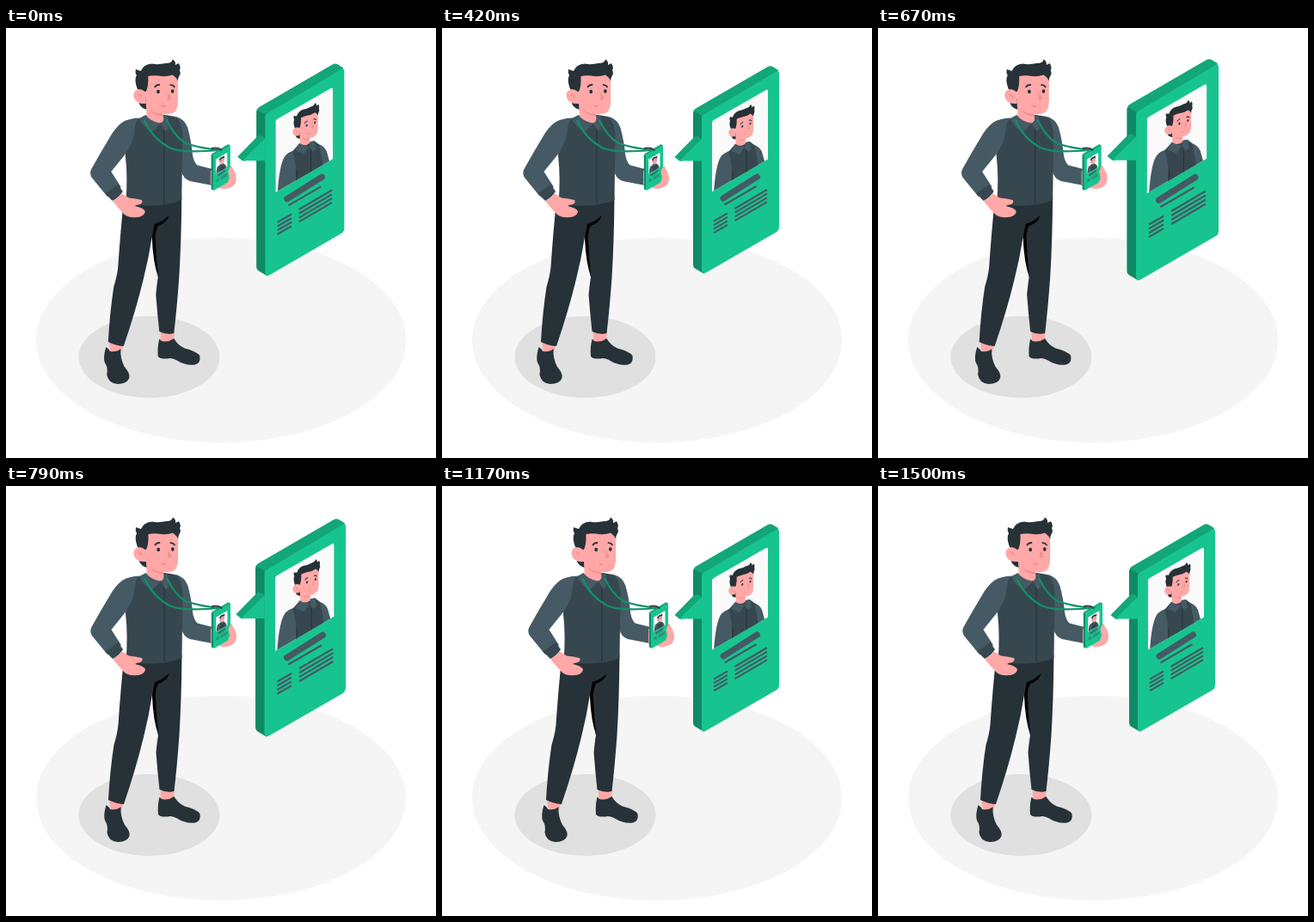
These frames come from a looping animation (500x500 px, 1540 ms). An HTML page:

```html
<!DOCTYPE html>
<html lang="en">
<head>
<meta charset="utf-8">
<title>Badge holder</title>
<style>
  html, body { margin: 0; width: 100%; height: 100%; overflow: hidden; background: #fff; }
  svg { display: block; width: 100%; height: 100%; }
  .green { fill: #17c48f; }
  .top { fill: #13a679; }
  .side { fill: #108a65; }
  .ink { fill: #263238; }
  .vest { fill: #37474f; }
  .sleeve { fill: #455a64; }
  .skin { fill: #ffa8a7; }
  .shade { fill: #f28f8f; }
  .line { fill: none; stroke: #263238; stroke-linecap: round; }
  .bars { fill: none; stroke: #455a64; stroke-width: 2.1; }
  .name { stroke-width: 7; stroke-linecap: round; }
  .strap { fill: none; stroke: #128f68; stroke-width: 2.2; }
</style>
</head>
<body>
<svg viewBox="0 0 500 500">
  <defs>
    <clipPath id="frame"><path d="M314 108 L379 71 V152.500 L314 190.500Z"/></clipPath>

    <g id="head">
      <path class="ink" d="M155 82 L164 82 L165 95 Q158 94 155 88Z"/>
      <path class="skin" d="M163 54 H199 Q201 66 200 77 Q201 92 197 97 Q192 101 183 100 L184 109 Q175 114 164 105 L163 88Z"/>
      <path class="shade" d="M167 94 Q174 100 183 100 L183 102.500 Q172 102 167 94Z"/>
      <path class="ink" d="M153 71 Q149 60 152 55 Q150 52 151 48 L157 50 Q160 42 170 41.500 Q177 43 186 41 Q193 41 194 36.500 Q198 39 197 43 L201 41 Q204 46 202 49 Q204 53 201.500 56 Q200 58 200.500 62 Q198 57 194 54.500 Q186 57.500 177 55.500 Q171 55 165.500 56 Q166 68 163 74 L160 75Z"/>
      <path class="skin" d="M163 75 Q158 70 153 71.500 Q147 74 149 81 Q152 89 163 88Z"/>
      <path class="shade" d="M153 76 Q158 76 159 82 Q155 79 153 76Z"/>
      <ellipse class="ink" cx="177.200" cy="74" rx="1.900" ry="2.200"/>
      <ellipse class="ink" cx="193.800" cy="73.500" rx="1.800" ry="2.200"/>
      <path class="line" stroke-width="1.800" d="M173.500 68.500 Q175 66 178.500 66 M191.500 66.200 Q194.500 66 196 68.500"/>
      <path class="shade" d="M187.500 74 Q192 79 192.500 82 Q190 84.500 187 83 Q190 81.500 187.500 74Z"/>
      <path class="shade" d="M179.500 89 Q183 91 186.500 89.500 Q185 93 182 92.200Z"/>
    </g>

    <g id="body">
      <path class="top" d="M292.500 97 Q293 94.500 296 93 L378 45.500 Q381.500 43.200 384.500 45 L391 49 L389 53 L302 103Z"/>
      <path class="side" d="M292.500 96.500 L303 102 V282 L305 286 L294 279.500 Q292 278 292 275 V99Z"/>
      <path class="green" d="M302 104 Q302 102 304 101 L388 51 Q392 48.500 392 53 V231 Q392 235.500 388.500 237.500 L307 284.500 Q302 287 302 281Z"/>
    </g>

    <g id="data">
      <path fill="#fafafa" d="M314 110 Q314 108 316 107 L376 72.500 Q379 70.500 379 74 V152.500 L314 190.500Z"/>
      <g clip-path="url(#frame)">
        <path class="sleeve" d="M316 192 Q318 160 324 150 Q327 145 336 142.500 L360 135 Q369 137 372 144 L377 162 L340 190Z"/>
        <path class="vest" d="M333 144 L341 135 L358 132 L363 136 Q367 149 369 175 L336 190 Q339 158 333 144Z"/>
        <path class="line" stroke-width=".9" d="M354 143 V175 M336 181 Q339 174 338 165"/>
        <use href="#head" transform="matrix(.56 -.18 0 .6 250 102)"/>
        <path class="sleeve" d="M336.500 143 L341 134.500 Q345 138 352 138.500 L346 147Z M352 138.500 L354 133 L358 132 L360 141 L356 144Z"/>
      </g>
      <path class="bars name" d="M327 198 L366.500 173"/>
      <path class="bars" d="M328.500 205.500 L365.500 184"/>
      <path class="bars" d="M316 224.600 l16 -9.200 m-16 13.700 l16 -9.200 m-16 13.700 l16 -9.200 m-16 13.700 l16 -9.200"/>
      <path class="bars" d="M340.500 210 l37.500 -22 m-37.500 26.700 l37.500 -22 m-37.500 26.700 l37.500 -22 m-37.500 26.700 l37.500 -22"/>
    </g>
  </defs>

  <ellipse cx="250" cy="363" rx="215" ry="119" fill="#f5f5f5"/>
  <ellipse cx="166.500" cy="382.500" rx="82" ry="47.500" fill="#e0e0e0"/>

  <g id="man">
    <path class="skin" d="M120 364 L137 367 L134 377 L122 378Z M180 350 H196 L195 367 L180 366Z"/>
    <path class="ink" d="M116.500 371 Q120 373 121.500 376 Q129 377 133.500 373 Q133 385 138 394 Q145 402 143.500 407 Q141 414 130 414 Q119 413 117.500 403 Q119 394 115.500 390 Q112.500 384 116.500 371Z"/>
    <path class="ink" d="M178.500 361.500 Q181 365 184 364.500 Q190 365 195.500 361 Q200 369 208 372.500 Q222 376 225.500 381 Q227 390 220 391.500 Q209 393 198 386 Q192 383 188 384.500 Q179 385 177 382 Q176 372 178.500 361.500Z"/>
    <path class="ink" d="M137.500 196 H204.500 Q204 250 201.500 290 Q199 325 195.500 355 Q187 357 178.500 353 Q176 330 174.500 310 Q176 295 177 290 L170 243 Q166 268 160 292 Q151 329 137 370 Q128 369.500 119 365 Q121 330 125.500 301 Q129.500 288 130.500 278 Q133 240 137.500 196Z"/>
    <path fill="#000" d="M170 244 L173 228 Q183 225 189.500 218 Q188 226 177 230 Q173 238 174 247 Q175 270 177.300 290 Q171 272 170 244Z"/>

    <path class="sleeve" d="M198 103 Q208 106 211.500 116 Q216 133 217 146 Q218 155 222.500 159.500 L240 164 V183 L214 178 Q206 175 204 166Z"/>
    <path class="vest" d="M153 106 L162 102 L185 101 L197 103 Q204 107 205.500 125 L204.500 200 Q190 206 170 206.500 Q150 207 139.500 203 Q142 175 139 148 Q140 125 153 106Z"/>
    <path class="sleeve" d="M156 104.500 Q142 105 135 110 Q127 116 121 127 Q110 145 99.500 164 Q97 169 100 174 L118 196 L134 185 L122.500 167 L139.500 146 Q150 130 150 116 Q151 108 156 104.500Z"/>
    <path class="vest" d="M115.500 192.500 L130.500 182 L136 190 Q132 197 124 201Z"/>
    <path class="line" stroke-width="1.100" d="M184 118 V204"/>

    <path class="skin" d="M124 201 Q131 198 135 192.500 L143 197.500 Q151 198 158 200 Q160 203 156 205 Q151 206 150 207 Q160 209 162 213 Q162 217 156 219.500 Q145 222 138 217 Q131 210 124 201Z"/>

    <use href="#head"/>
    <path class="sleeve" d="M155 105.500 L162.500 101 Q167 108 180 111 L170 121 Q160 116 155 105.500Z M180 111 Q185 107 184 101 L188.500 103.500 L189 118 L185.500 120Z"/>
    <path class="strap" d="M161 107 Q170 128 190 139 Q205 146 246 142 M187 107 Q196 126 209 134 Q222 139 248 142"/>

    <path class="skin" d="M238 166 Q252 164 260 160 Q264 162 266 167 Q269 175 267 180 Q262 187 252 187 L238 182Z"/>
    <use href="#body" transform="translate(174 125.500) scale(.222)"/>
    <use href="#data" transform="translate(179.800 130.500) scale(.205)"/>
    <path d="M239 140 Q247 138 251.500 142.500" fill="none" stroke="#37474f" stroke-width="2"/>
    <path class="skin" d="M262.500 160 Q259 163 258.500 167 L260 174 L257 182 Q255 185 250 186.500 Q261 188 266 182 Q269 176 267 169 Q266 166 262.500 166 Q264 162 262.500 160Z"/>
  </g>

  <g id="card">
    <use href="#body"/>
    <path class="top" d="M270.500 150 L293 127 Q297 124 302 129 L279 155 L276 154.500Z"/>
    <path class="green" d="M276 154.500 L302 129 V154.500Z"/>
    <use href="#data"/>
  </g>
</svg>
<script>
  const LOOP = 1540, CYCLE = 1500, FPS = 24, LEAD = 33;
  const shake = [0, -1, 2, -4, 4, -4, 4, -4, 2, -1, 0];
  const beat = [1, 1.1, 1.05, 1, 1, 1.1, 1, 1, 1, 1, 1];
  const man = document.getElementById('man');
  const card = document.getElementById('card');
  const start = performance.now();

  // keys are spaced evenly, one per tenth of the cycle
  function sample(keys, p) {
    const i = Math.min(Math.floor(p * 10), 9);
    return keys[i] + (keys[i + 1] - keys[i]) * (p * 10 - i);
  }

  function draw() {
    const t = (performance.now() - start) % LOOP;
    const step = Math.floor((t + 5) * FPS / 1000);
    const p = Math.min((step * 1000 / FPS + LEAD) / CYCLE, 1);
    man.setAttribute('transform', `translate(${sample(shake, p)} 0)`);
    card.setAttribute('transform',
      `translate(331.2 165) scale(${sample(beat, p)}) translate(-331.2 -165)`);
    requestAnimationFrame(draw);
  }
  draw();
</script>
</body>
</html>
```
